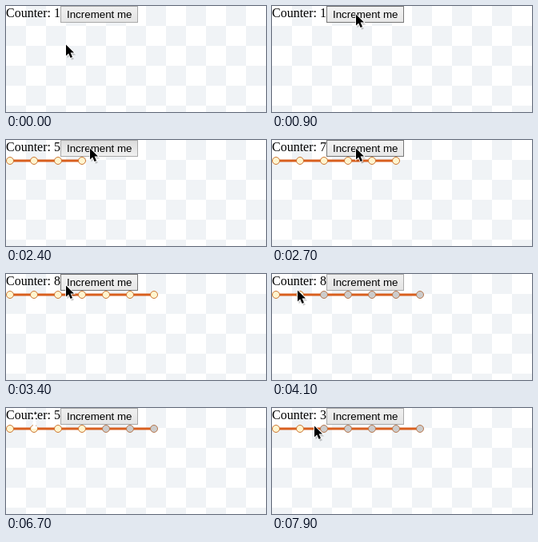
Recreate the animation shown at these times as an HTML page. Size 325 by 133 pixels, loop 8 s.

```html
<!DOCTYPE html>
<html lang="en">
<head>
<meta charset="utf-8">
<title>Counter with history</title>
<style>
  html, body { margin: 0; width: 100%; height: 100%; overflow: hidden; background: #fff; }
  body { position: relative; }
  body > * { position: absolute; left: 0; top: 0; }
  .checks {
    width: 325px; height: 133px;
    background: conic-gradient(#fff 25%, #f0f3f6 0 50%, #fff 0 75%, #f0f3f6 0) 25px 0 / 50px 50px;
  }
  .count { font: 16px/18px "Liberation Serif", "Times New Roman", serif; white-space: pre; }
  .button {
    left: 68px; box-sizing: border-box; width: 97px; height: 21px; padding: 2px 7px;
    border: 1px solid #a9a9a9; background: linear-gradient(#f0f0f0, #e4e4e4);
    font: 13.3333px/15px "Liberation Sans", Arial, sans-serif; white-space: nowrap;
  }
  .button.over { border-color: #777; background: linear-gradient(#f3f3f3, #e7e7e7); }
  .button.down { border-color: #a9a9a9; background: linear-gradient(#dcdcdc, #f0f0f0); }
  .dot { fill: #fff5cf; stroke: #cc7430; }
  .dot.off { fill: #ccc; stroke: #b8754a; }
</style>
</head>
<body>
<div class="checks"></div>
<div class="count">Counter: <span id="value">1</span></div>
<div id="button" class="button">Increment me</div>
<svg width="325" height="133">
  <path id="line" stroke="#d95f1e" stroke-width="3"/>
  <g id="dots"></g>
  <g id="arrow">
    <path d="M1.5 3.5v15l3.2-3 2.4 5.2 2.8-1.2-2.4-5.1h4.7z" opacity=".2"/>
    <path d="M0 1.5v14l3.2-3 2.4 5.5 2.4-1-2.4-5.4h4.4z" stroke="#fff" stroke-width="1.6" paint-order="stroke"/>
  </g>
  <g id="beam" fill="none">
    <path id="bar" d="M-3.5-7.5q3 0 3.5 1.5q.5-1.5 3.5-1.5M0-6v12M-3.5 7.5q3 0 3.5-1.5q.5 1.5 3.5 1.5M-2 2h4" stroke="#fff" stroke-width="3"/>
    <use href="#bar" style="stroke: #000; stroke-width: 1"/>
  </g>
</svg>
<script>
const LOOP = 8000, TICK = 100;
const COUNT = 7, GAP = 30, LEFT = 5, MIDDLE = 26, REACH = 7.7;
const $ = id => document.getElementById(id);

// Pointer moves; it rests in between.
const moves = [
  { from: 0, to: 0, x: 75, y: 47 },
  { from: 400, to: 600, x: 85, y: 34 },
  { from: 700, to: 900, x: 105, y: 9 },
  { from: 3100, to: 3800, x: 29, y: 19 },
  { from: 3900, to: 4100, x: 32, y: 19 },
  { from: 4900, to: 5300, x: 95, y: 20 },
  { from: 6200, to: 6700, x: 35, y: 17 },
  { from: 6800, to: 7100, x: 33, y: 24 },
  { from: 7800, to: 7900, x: 53, y: 21 }
];
const clicks = [1300, 1900, 2000, 2200, 2500, 2700, 2900, 4600, 5900, 7400];

const dotX = i => LEFT + GAP * i;
const dots = Array.from({ length: COUNT }, (_, i) => {
  const dot = document.createElementNS("http://www.w3.org/2000/svg", "circle");
  dot.setAttribute("cx", dotX(i));
  dot.setAttribute("cy", MIDDLE);
  dot.setAttribute("r", 4.5);
  $("dots").append(dot);
  return dot;
});

const ease = k => k * k * (3 - 2 * k);

function pointer(t) {
  let { x, y } = moves[0];
  for (const m of moves.slice(1)) {
    const k = ease(Math.min(1, Math.max(0, (t - m.from) / (m.to - m.from))));
    x += (m.x - x) * k;
    y += (m.y - y) * k;
  }
  return { x: Math.round(x), y: Math.round(y) };
}

const onButton = p => p.y < 18 && p.x >= 68 && p.x < 165;
const onText = p => p.y < 18 && p.x < 68;

function dotUnder(p, made) {
  const i = Math.round((p.x - LEFT) / GAP);
  return i < made && Math.hypot(p.x - dotX(i), p.y - MIDDLE) < REACH ? i : -1;
}

// Replays the clicks so far: the button adds a state, a dot returns to one.
function history(t) {
  let made = 0, current = -1;
  for (const click of clicks.filter(c => c <= t)) {
    const p = pointer(click), dot = dotUnder(p, made);
    if (onButton(p)) current = made++;
    else if (dot >= 0) current = dot;
  }
  return { made, current };
}

function draw(t) {
  const p = pointer(t);
  const { made, current } = history(t);
  const hovered = dotUnder(p, made);
  const last = hovered >= 0 ? hovered : current;

  $("value").textContent = current + 2;
  $("line").setAttribute("d", `M${LEFT} ${MIDDLE}h${GAP * Math.max(0, made - 1)}`);
  dots.forEach((dot, i) => {
    dot.style.display = i < made ? "" : "none";
    dot.setAttribute("class", i <= last ? "dot" : "dot off");
  });

  const over = onButton(p);
  $("button").classList.toggle("over", over);
  $("button").classList.toggle("down", over && clicks.some(c => t >= c - TICK && t < c));

  const text = onText(p);
  $("arrow").style.display = text ? "none" : "";
  $("beam").style.display = text ? "" : "none";
  $("arrow").setAttribute("transform", `translate(${p.x} ${p.y})`);
  $("beam").setAttribute("transform", `translate(${p.x + .5} ${p.y})`);
}

const start = performance.now();
function frame() {
  const t = (performance.now() - start) % LOOP;
  draw(Math.floor(t / TICK) * TICK);
  requestAnimationFrame(frame);
}
draw(0);
requestAnimationFrame(frame);
</script>
</body>
</html>
```
